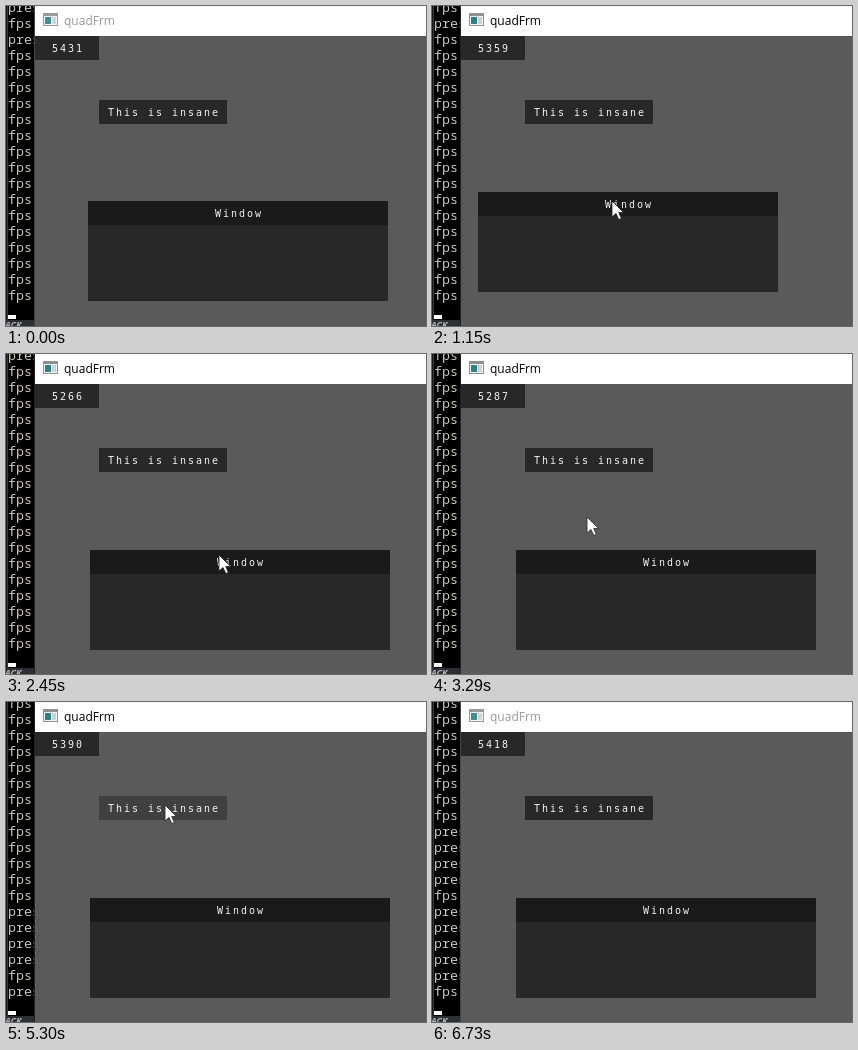
These frames come from a looping animation (420 by 320 pixels, 6840 ms). An HTML page:

```html
<!DOCTYPE html>
<html lang="en">
<head>
<meta charset="utf-8">
<title>Window drag demo</title>
<style>
  html, body { margin: 0; width: 100%; height: 100%; overflow: hidden; background: #000; }
  svg { display: block; width: 420px; height: 320px; }
  .ui { font: 10px "DejaVu Sans Mono", monospace; letter-spacing: 1.98px; fill: #f4f4f4; }
  .term { font: 13.3px "Noto Sans Mono", "DejaVu Sans Mono", monospace; fill: #ccc4b8; }
  .title { font: 12px "Open Sans", sans-serif; }
  .tab { font: italic bold 9px "Open Sans", sans-serif; fill: #b4b6ba; }
</style>
</head>
<body>
<svg viewBox="0 0 420 320" shape-rendering="crispEdges">
  <rect width="420" height="320" fill="#000"/>
  <rect width="1" height="320" fill="#17191c"/>
  <rect x="1" width="1" height="314" fill="#33363a"/>
  <g id="rows" class="term"></g>
  <rect id="caret" x="2" y="309" width="8" height="4" fill="#fff"/>
  <rect y="314" width="28" height="6" fill="#2b2e33"/>
  <text class="tab" x="-1" y="322">ACK</text>

  <rect id="edge" x="28" width="1" height="320"/>
  <rect x="29" width="391" height="30" fill="#fff"/>
  <g id="icon">
    <rect x="37" y="7" width="15" height="13" fill="#8c9196"/>
    <rect x="38" y="10" width="13" height="9" fill="#f4f6f7"/>
    <rect x="39" y="11" width="6" height="7" fill="#2f8184"/>
    <rect x="46" y="11" width="4" height="7" fill="#c9d3d8"/>
  </g>
  <text id="title" class="title" x="58" y="19">quadFrm</text>

  <rect x="29" y="30" width="391" height="290" fill="#5a5a5a"/>
  <rect x="29" y="30" width="64" height="24" fill="#282828"/>
  <text id="count" class="ui" x="46" y="46"></text>
  <rect id="button" x="93" y="94" width="128" height="24"/>
  <text class="ui" x="102" y="110">This is insane</text>

  <g id="panel">
    <rect width="300" height="100" fill="#282828"/>
    <rect width="300" height="24" fill="#1a1a1a"/>
    <text class="ui" x="127" y="16">Window</text>
  </g>
  <path id="mouse" d="M0 0V16L4 12.5L6.8 18.6L9.4 17.4L6.7 11.5H11.5Z"
        fill="#fff" stroke="#222" stroke-width=".8" shape-rendering="auto"/>
</svg>
<script>
const LOOP = 6840;
const GRAB = 350, DROP = 2290;       // panel follows the mouse in between
const HOLD = [134, 9];               // mouse offset inside the panel
const FOCUS = [330, 6730];

// time, x, y of the mouse tip
const path = [
  [80, 334, 324], [200, 280, 262], [330, 216, 204], [380, 216, 204],
  [520, 226, 196], [650, 246, 190], [770, 245, 192], [860, 245, 192],
  [960, 236, 210], [1050, 206, 207], [1150, 180, 195], [1178, 180, 195],
  [1240, 181, 186], [1330, 196, 182], [1430, 192, 190], [1510, 180, 194],
  [1605, 180, 194], [1650, 177, 194], [1670, 177, 194], [1760, 179, 204],
  [1880, 196, 211], [2010, 219, 209], [2090, 223, 207], [2290, 218, 205],
  [2450, 213, 201], [2600, 187, 140], [2750, 166, 86], [2840, 160, 75],
  [2950, 157, 98], [3045, 157, 98], [3200, 152, 140], [3320, 156, 165],
  [3480, 162, 122], [3630, 159, 103], [5350, 159, 103], [5700, 168, 108],
  [6030, 168, 108], [6160, 210, 158], [6350, 308, 252], [6560, 375, 322]
];

const counts = [[0, 5431], [760, 5359], [2060, 5266], [3100, 5287],
  [4130, 5309], [5130, 5390], [6200, 5418]];

// mouse button down and up; the log gets a line on release
const clicks = [[3840, 4300], [4650, 4710], [4790, 4860], [4930, 5000], [5190, 5260],
  [5360, 5420], [5480, 5540], [5600, 5660], [5720, 5790]];

const log = [
  ...counts.slice(1).map(c => [c[0], "fps:"]),
  ...clicks.map(c => [c[1], "pressed"])
].sort((a, b) => a[0] - b[0]);

const ROWS = 19;
const start = Array.from({ length: ROWS }, (_, i) => i === 0 || i === 2 ? "pressed" : "fps:");

const el = id => document.getElementById(id);
const [rowBox, caret, edge, icon, title, count, button, panel, mouse] =
  ["rows", "caret", "edge", "icon", "title", "count", "button", "panel", "mouse"].map(el);

const rows = start.map((_, i) => {
  const row = document.createElementNS("http://www.w3.org/2000/svg", "text");
  row.setAttribute("x", 2);
  row.setAttribute("y", 6 + i * 16);
  return rowBox.appendChild(row);
});

const within = (t, [a, b]) => t >= a && t < b;
const place = (node, x, y) => node.setAttribute("transform", `translate(${x} ${y})`);
const slope = (i, k) => (path[i + 1][k] - path[i][k]) / (path[i + 1][0] - path[i][0]);

// monotone tangent, so the mouse never overshoots a point
function tangent(i, k) {
  if (i === 0 || i === path.length - 1) return slope(Math.min(i, path.length - 2), k);
  const a = slope(i - 1, k), b = slope(i, k);
  return a * b > 0 ? 2 * a * b / (a + b) : 0;
}

function mouseAt(t) {
  const end = path.length - 1;
  t = Math.max(path[0][0], Math.min(path[end][0], t));
  let i = 0;
  while (i < end - 1 && t >= path[i + 1][0]) i++;
  const p = path[i], q = path[i + 1], d = q[0] - p[0], u = (t - p[0]) / d;
  return [1, 2].map(k => Math.round(
    p[k] + (q[k] - p[k]) * u * u * (3 - 2 * u) +
    d * u * (1 - u) * ((1 - u) * tangent(i, k) - u * tangent(i + 1, k))));
}

function render(t) {
  const [x, y] = mouseAt(t);
  const shown = within(t, [90, 6560]);
  mouse.style.display = shown ? "" : "none";
  place(mouse, x, y);

  const [hx, hy] = mouseAt(Math.max(GRAB, Math.min(DROP, t)));
  place(panel, hx - HOLD[0], hy - HOLD[1]);

  const over = shown && x >= 93 && x < 221 && y >= 94 && y < 118;
  const down = clicks.some(c => within(t, c));
  button.setAttribute("fill", down ? "#7a7a7a" : over ? "#404040" : "#282828");

  const active = within(t, FOCUS);
  title.setAttribute("fill", active ? "#000" : "#999");
  icon.setAttribute("opacity", active ? 1 : 0.9);
  edge.setAttribute("fill", active ? "#222" : "#444");

  count.textContent = counts.filter(c => c[0] <= t).pop()[1];
  const lines = [...start, ...log.filter(l => l[0] <= t).map(l => l[1])].slice(-ROWS);
  rows.forEach((row, i) => {
    if (row.textContent !== lines[i]) row.textContent = lines[i];
  });
  caret.style.display = within(t, [4300, 4650]) ? "none" : "";
}

const t0 = performance.now();
function tick() {
  render((performance.now() - t0) % LOOP);
  requestAnimationFrame(tick);
}
tick();
</script>
</body>
</html>
```
